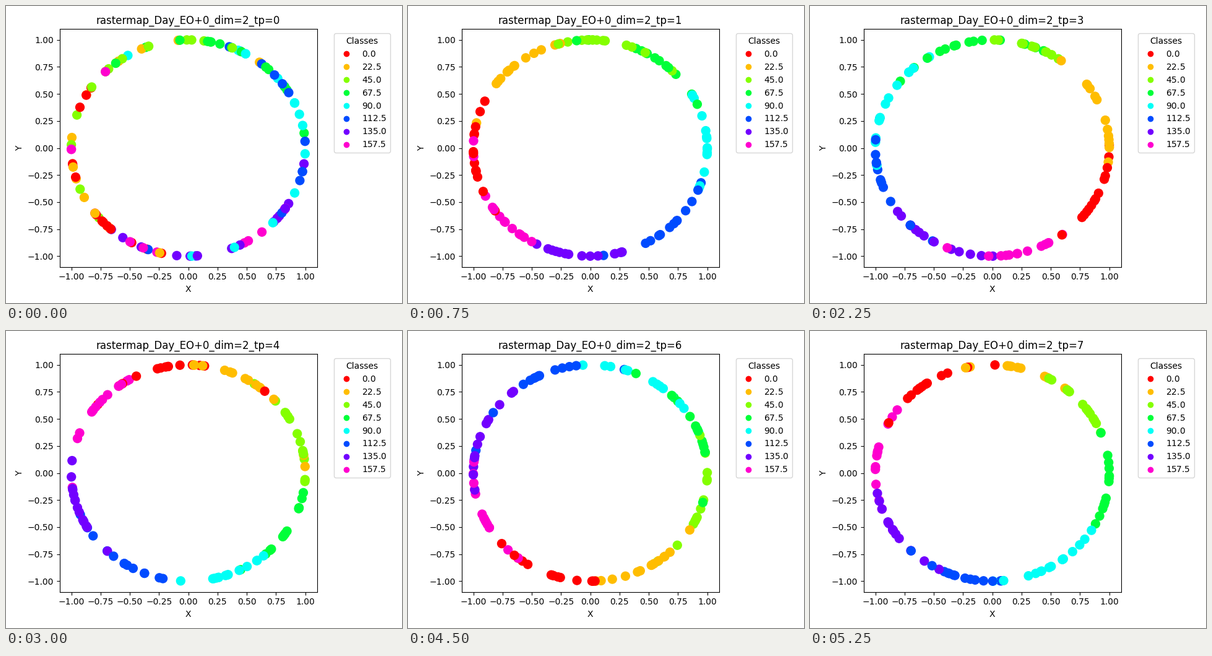
Recreate the animation shown at these times as a matplotlib script. Size 640 px wide and 480 px high, loop 6000 ms.

```python
import matplotlib.pyplot as plt
import numpy as np
from matplotlib.animation import FuncAnimation

CLASSES = 8
STEP = 22.5      # spacing between class labels
PER_CLASS = 14
HOLD = 750       # ms per time point

# Per time point: angle of the first class, turning direction, spread (degrees)
RINGS = [(210, -1, 50), (180, -1, 18), (180, -1, 18), (-30, 1, 18),
         (102, -1, 18), (110, -1, 18), (-112, 1, 18), (127, -1, 18)]


def ring(tp):
    """Class sectors in order round the circle, jittered and shuffled."""
    start, turn, spread = RINGS[tp]
    rng = np.random.default_rng(tp)
    cls = rng.permutation(np.repeat(np.arange(CLASSES), PER_CLASS))
    angle = np.radians(start + turn * 360 / CLASSES * cls
                       + rng.normal(0, spread, cls.size))
    return np.column_stack([np.cos(angle), np.sin(angle)]), cls * STEP


fig, ax = plt.subplots(figsize=(6.4, 4.8), dpi=100)
points, labels = ring(0)
dots = ax.scatter(*points.T, c=labels, s=100, cmap="hsv", vmin=0, vmax=180)
title = ax.set_title("rastermap_Day_EO+0_dim=2_tp=0")
ax.set(xlabel="X", ylabel="Y", xlim=(-1.1, 1.1), ylim=(-1.1, 1.1))
ax.legend(*dots.legend_elements(), title="Classes",
          bbox_to_anchor=(1.05, 1), loc="upper left")
fig.tight_layout()


def draw(tp):
    points, labels = ring(tp)
    dots.set_offsets(points)
    dots.set_array(labels)
    title.set_text(f"rastermap_Day_EO+0_dim=2_tp={tp}")
    return dots, title


anim = FuncAnimation(fig, draw, frames=len(RINGS), interval=HOLD,
                     init_func=lambda: draw(0), repeat=True, repeat_delay=0)
plt.show()
```
